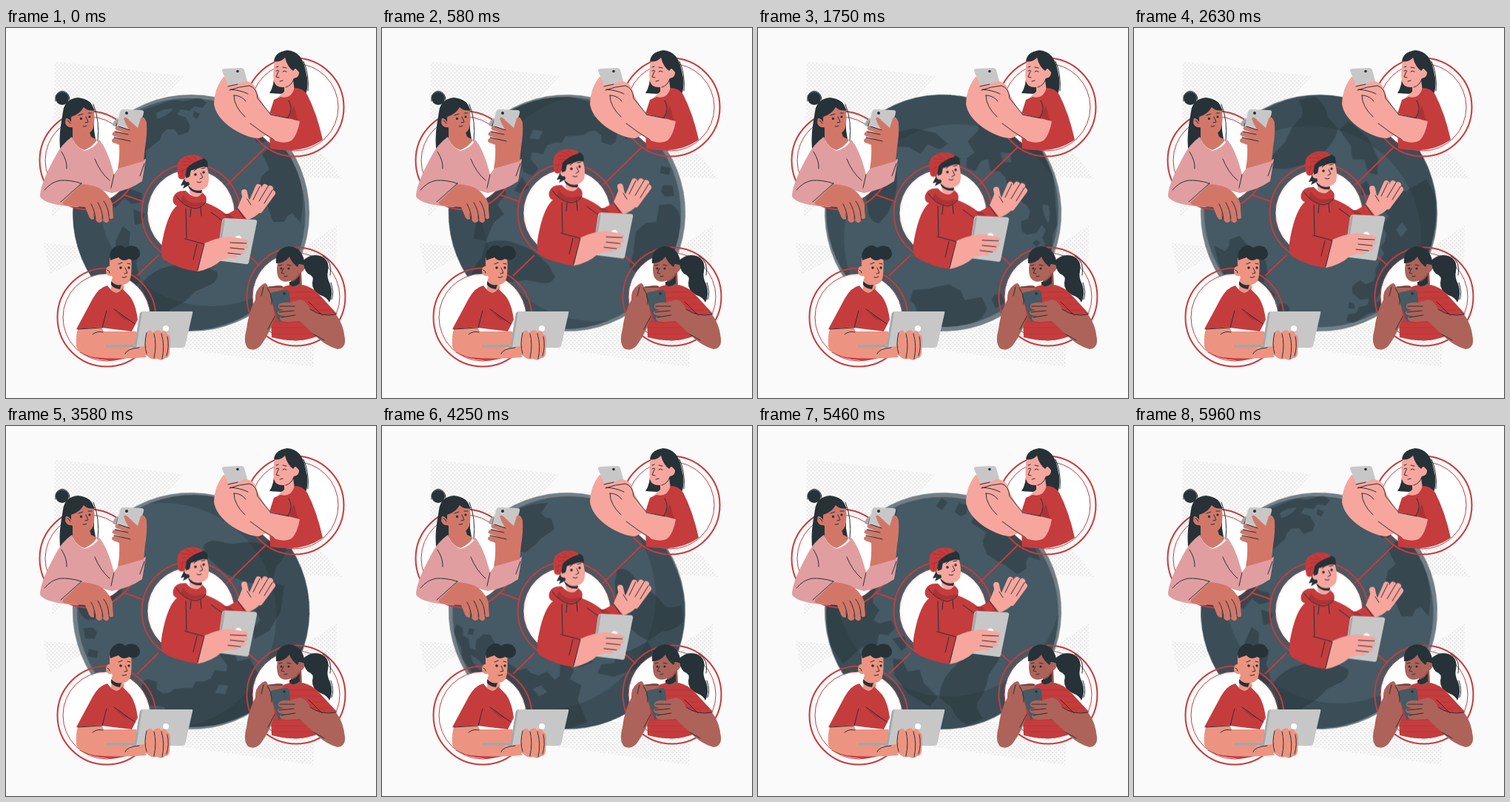
Write an HTML page that moves like this. It is 500 by 500 pixels and loops after 6 s.

```html
<!DOCTYPE html>
<html lang="en">
<head>
<meta charset="utf-8">
<title>Connected world</title>
<style>
html, body { margin: 0; width: 100%; height: 100%; overflow: hidden; background: #fafafa; }
svg { display: block; width: 100vw; height: 100vh; }
#globe { transform-origin: 250px 250px; }
.red { fill: #c53c3d; }
.deep { fill: #a93335; }
.dark { fill: #263238; }
.grey { fill: #c7c7c7; }
.edge { fill: #a6a6a6; }
.white { fill: #fff; }
.pink { fill: #e09ea0; }
.s1 { fill: #d27768; }
.s2 { fill: #f6a69d; }
.s3 { fill: #ec9481; }
.s4 { fill: #ad6359; }
.s5 { fill: #96524a; }
.land { fill: #37474f; }
.line { fill: none; stroke: #263238; stroke-width: 1; stroke-linecap: round; stroke-linejoin: round; }
.ring { fill: none; stroke: #c53c3d; stroke-width: 2; }
.rib { fill: none; stroke: #a93335; stroke-width: 1; }
.fingers { fill: none; stroke: #f6a69d; stroke-width: 8; stroke-linecap: round; }
</style>
</head>
<body>
<svg viewBox="0 0 500 500">
  <defs>
    <pattern id="dots" width="5.4" height="5.4" patternUnits="userSpaceOnUse">
      <circle cx="1.350" cy="1.350" r="1.050" fill="#e0e0e0"/>
      <circle cx="4.050" cy="4.050" r="1.050" fill="#e0e0e0"/>
    </pattern>
    <clipPath id="disc"><circle cx="247.5" cy="251.8" r="157"/></clipPath>
  </defs>

  <path fill="url(#dots)" d="M66 45L240 65L62 256ZM393 130L456 204L378 200ZM50 290L122 298L60 333ZM447 266L446 325L372 318ZM205 402L420 398L415 458L225 432Z"/>

  <g id="globe">
    <circle cx="250" cy="250" r="160" fill="#737f86"/>
    <g clip-path="url(#disc)">
      <rect x="88" y="88" width="324" height="324" fill="#455a64"/>
      <g class="land">
        <path d="M346 170L358 160Q373 158 386 175Q402 205 401 242L398 263L387 250L380 254L376 262L361 262L354 242L349 234L341 217L345 200L356 191Z"/>
        <path d="M183 346Q198 326 222 322Q236 317 250 319L270 322L286 330Q288 343 272 349L256 356Q242 372 224 379Q216 384 218 402L196 398Q186 385 190 366Z"/>
        <path d="M225 97L240 99L262 94L271 101L265 108L254 106L248 112L236 110L231 117L243 121L249 133L246 141L233 145L228 137L217 137L211 143L208 151L197 160L189 166L190 176L182 181L176 190L178 203L164 210L168 218L184 223L183 235L170 238L160 230L148 243L130 233L98 238L95 200L130 145L165 118Z"/>
        <path d="M318 125L330 120L334 129L322 134ZM335 145L346 138L356 148L346 156L338 154Z"/>
        <path d="M172 245L188 251L183 264L174 266ZM158 268L168 276L166 294L181 300L176 318L182 344L166 350L150 318L148 288ZM254 112L262 116L258 123L252 119Z"/>
      </g>
      <path fill="#455a64" d="M203 115Q214 108 226 109Q218 119 204 123ZM148 184L160 178L162 190L151 196Z"/>
      <path fill="#263238" opacity=".3" fill-rule="evenodd" d="M80 80H420V420H80ZM124 223a153 153 0 1 0 306 0a153 153 0 1 0 -306 0Z"/>
    </g>
  </g>

  <path class="ring" d="M158 225L187 235M352 160L299 212M206 307L177 335M327 307L343 321"/>
  <g id="rings"></g>

  <!-- woman with bun -->
  <g>
    <circle class="dark" cx="76" cy="95" r="9"/>
    <path class="line" d="M67 99Q65 87 76 85Q86 87 86 97M118 103Q127 125 124 153"/>
    <path class="dark" d="M77 113Q79 96 97 94Q117 96 119 112L119 138L121 150L110 160L92 148L86 160L74 171Q71 150 74 132Z"/>
    <path class="s1" d="M90 134L90 150Q96 163 106 165Q118 160 123 151L115 147L112 138Z"/>
    <path class="s1" d="M87 117Q80 119 80 128Q82 135 89 134Q94 143 103 145Q114 145 118 135Q121 122 118 109L104 106Z"/>
    <path class="dark" d="M78 124Q78 103 94 98Q111 97 120 111Q111 113 105 107Q99 117 88 120L88 127Q83 119 78 124Z"/>
    <path class="line" d="M108 120L111 127L107 128M104 133Q107 134 109 132M98 118L104 116M111 115L116 115M83 125Q86 126 87 129"/>
    <circle class="dark" cx="101.500" cy="122.500" r="1.700"/><circle class="dark" cx="113" cy="120" r="1.600"/>
    <path class="pink" d="M89 147Q75 157 67 173Q48 207 46 225Q44 236 84 241L98 242L107 213L143 223Q167 219 184 207L189 177L152 189L146 198Q137 163 126 151Q121 162 106 166Q93 161 89 147Z"/>
    <path class="grey" d="M158 110L184 111Q187 112 186 115L174 158L146 156Q144 155 145 151L154 114Q155 110 158 110Z"/>
    <path class="edge" d="M146 126L152 121L148 133L144 132Z"/>
    <circle class="dark" cx="163" cy="115" r="2"/>
    <path class="s1" d="M151 190Q154 175 153 158L144 154Q141 151 146 149L157 150L144 145Q142 141 148 140L160 142L148 137Q146 133 152 133L166 137Q161 129 159 122Q162 119 167 125L178 135L182 122Q187 118 190 128Q191 143 188 161L186 180Z"/>
    <path class="line" d="M147 140L165 144M146 148L168 153M152 133L167 138M75 167Q83 180 82 190M102 210Q86 205 73 206Q61 208 52 219M102 210L74 235M120 177Q127 195 140 206M146 198L142 216M187 183L181 200"/>
    <path class="s1" d="M102 211Q128 212 138 227Q145 235 144 245L145 256Q143 260 140 257L138 250L139 261Q135 266 131 260L129 252L130 261Q125 266 121 259L118 249L119 258Q114 261 111 252L107 242L82 240Q73 238 79 233Z"/>
    <path class="line" d="M132 234Q138 241 139 254M124 236Q130 246 131 258M115 238Q120 247 121 258"/>
  </g>

  <!-- woman with long hair -->
  <g>
    <path class="dark" d="M363 48Q361 33 380 30Q400 31 405 58Q410 76 405 90L388 86L371 89L356 88Q363 78 362 60Z"/>
    <path class="line" d="M402 45Q410 62 408 85"/>
    <path class="s2" d="M388 70L390 85Q385 100 371 99L366 95L376 86L376 78Z"/>
    <path class="s2" d="M364 42Q360 58 362 72Q365 81 375 80Q386 78 389 68Q397 67 396 58Q393 53 388 56L380 38Z"/>
    <path class="dark" d="M362 45Q364 31 382 31Q399 36 398 62L391 54L388 58Q380 52 377 40Q371 47 362 45Z"/>
    <path class="line" d="M368 59L365 66L369 67M370 72L374 71M365 53L368 52M374 53L379 54M378 80Q386 78 389 69"/>
    <path class="line" d="M365 58Q367 56 369 58M374 59Q376 57 379 59"/>
    <path class="s2" d="M294 66Q281 82 281 103Q284 121 306 136Q327 149 342 149L356 143L351 115L316 72Z"/>
    <path class="red" d="M390 81Q401 81 407 90Q420 115 428 151Q400 171 357 163L355 119L362 97L371 93Q385 97 390 81Z"/>
    <path class="deep" d="M395 126L382 121L389 105Z"/>
    <path class="grey" d="M295 55L318 54Q321 54 322 57L328 78L302 82L292 58Q292 55 295 55Z"/>
    <circle class="dark" cx="313" cy="58.500" r="1.800"/>
    <path class="s2" d="M357 116L397 126Q394 144 386 152Q376 158 361 151L340 139L322 121Q307 106 308 91L300 91Q296 85 303 83L300 79Q302 74 312 76L323 72Q333 72 338 82Q340 94 357 116Z"/>
    <path class="line" d="M357 116L340 95Q339 81 329 78Q315 79 302 84M303 83Q317 84 327 89M308 91Q318 91 324 99M308 91Q308 106 323 120M330 129Q344 140 362 151M300 79L313 76M357 117L382 122M382 98Q389 109 381 121"/>
  </g>

  <!-- man in beanie -->
  <g id="man">
    <path class="dark" d="M240 205L236 213L241 212L239 217L252 210L249 193L272 188Q274 177 266 176L246 183L241 197Z"/>
    <path class="s2" d="M248 207L248 222Q256 236 267 224L263 216Z"/>
    <path class="dark" d="M246 212Q253 222 265 219L264 223Q252 224 247 216Z"/>
    <path class="s2" d="M249 193L271 186Q276 201 273 212Q268 220 259 219Q249 217 247 208Q241 209 241 203Q243 197 248 201Z"/>
    <path class="dark" d="M243 190Q248 177 264 175Q273 178 273 188Q263 188 258 185L250 192L248 201L243 203Z"/>
    <path class="red" d="M233 202Q229 184 235 178Q245 169 258 172Q265 174 266 177Q251 181 244 190L242 202Q237 207 233 202Z"/>
    <path class="rib" d="M237 202L239 190M234 194L243 191M238 186L247 185M237 180L250 181M243 175L253 180M251 172L258 178"/>
    <path class="line" d="M263 196L266 202L262 204M258 208Q261 210 264 208M254 193L258 190M264 190L269 189"/>
    <circle class="dark" cx="256" cy="198" r="1.800"/><circle class="dark" cx="267" cy="195" r="1.700"/>
    <path class="red" d="M226 229Q229 219 243 220Q257 235 265 223Q273 227 270 236Q286 242 298 252L313 244L326 257L310 267L294 262L291 287L268 292L259 329Q234 326 213 313Q207 307 212 284Q219 250 231 240Q224 238 226 229Z"/>
    <path class="deep" d="M239 226Q248 241 265 235L269 237Q252 248 236 234ZM293 251L301 251L310 258L303 261Z"/>
    <path class="line" d="M230 227Q240 242 256 244Q266 242 270 235M243 244L244 284M250 244L249 255M263 242L264 254M242 285L268 292M258 292L253 313M292 260L277 249M313 244L322 257"/>
    <path class="fingers" d="M322 222L326 240M341 215L331 238M350 215L336 240M357 217L340 244M360 223L343 246"/>
    <path class="s2" d="M313 243L320 226L330 232L353 234Q350 243 344 248Q336 257 326 259Z"/>
    <path class="line" d="M343 214L334 232M354 214L342 234M360 219L349 237M326 231L331 239"/>
    <path class="grey" d="M297 257L337 259Q340 260 339 263L328 317Q327 320 324 319L284 314L292 260Q293 257 297 257Z"/>
    <path class="edge" d="M293 260L296 258L287 314L284 314Z"/>
    <circle class="white" cx="314" cy="285" r="4.500"/>
    <path class="s2" d="M268 291Q285 283 302 282L322 285Q329 287 327 290L318 291L327 294Q328 298 322 298L316 298L324 302Q323 306 317 306L308 305L314 308Q312 312 304 310L292 313Q279 325 259 329Z"/>
    <path class="line" d="M303 290L325 291M303 297L322 299M300 304L317 306M268 292L259 327"/>
  </g>

  <!-- man with laptop -->
  <g>
    <path class="s3" d="M143 338L142 354Q153 363 160 351L158 346Z"/>
    <path class="dark" d="M142 342Q148 349 156 347L154 353Q145 352 142 347Z"/>
    <path class="s3" d="M140 310L169 309Q171 331 167 342Q162 348 155 347Q145 345 143 335Q135 336 135 328Q136 321 140 322Z"/>
    <path class="dark" d="M141 314Q138 302 147 296Q155 291 161 297Q168 292 176 296Q183 302 180 309Q175 316 166 312Q158 317 152 310L146 312Z"/>
    <path class="line" d="M161 324L164 331L160 332M157 337Q160 338 163 336M152 319L157 317M164 318L168 319M137 327Q140 328 140 331"/>
    <circle class="dark" cx="155" cy="324" r="1.800"/><circle class="dark" cx="166" cy="324" r="1.700"/>
    <path class="red" d="M137 348Q126 350 117 366L95 407L129 405L170 410L178 394Q175 371 166 361L157 352Q149 365 137 348ZM99 438Q130 456 167 445L160 430Z"/>
    <path class="deep" d="M146 382L176 400L169 396L160 394Z"/>
    <path class="s3" d="M97 407L129 404L132 410L176 410L176 430L165 433Q158 437 161 441L184 437L190 445Q150 448 120 445Q97 440 95 430Q94 416 97 407Z"/>
    <path class="line" d="M130 405L136 382M146 380L174 400M117 414Q123 409 131 411M97 407L129 405"/>
    <path class="edge" d="M136 428H188V432H136Q134 430 136 428Z"/>
    <path class="grey" d="M184 383L251 383Q253 383 252 386L242 430Q241 432 238 432L173 432L181 386Q182 383 184 383Z"/>
    <path class="edge" d="M181 385L184 383L176 432H173Z"/>
    <circle class="white" cx="216" cy="406" r="4"/>
    <path class="s3" d="M160 440Q158 436 165 433L187 430L190 411Q195 406 199 412Q205 405 210 411Q216 407 218 414Q222 414 222 421L221 440Q220 446 215 446Q210 451 205 447Q196 449 191 443L178 440Q167 443 160 440Z"/>
    <path class="line" d="M190 412Q186 427 190 440M200 413Q204 428 200 446M210 413Q215 429 211 447M218 417Q221 430 217 443M161 440Q164 433 180 432"/>
  </g>

  <!-- woman with ponytail -->
  <g>
    <path class="dark" d="M401 315Q411 304 425 308Q438 313 435 329Q433 337 438 346Q443 359 437 371Q434 364 425 361Q413 355 414 344Q417 335 408 332Q402 326 401 315Z"/>
    <path class="line" d="M428 308Q442 316 438 334M439 344Q444 358 440 367"/>
    <path class="s5" d="M386 335L384 349Q391 357 400 349L399 328Z"/>
    <path class="dark" d="M383 343Q391 343 397 334L397 345Q390 351 383 348Z"/>
    <path class="s4" d="M368 312Q364 327 368 337Q373 345 383 342Q393 339 396 331Q404 330 403 322Q401 316 395 320L388 305Z"/>
    <path class="dark" d="M365 318Q363 298 382 295Q399 296 403 314L402 320L396 319L394 323Q386 317 383 309Q376 318 365 318Z"/>
    <path class="line" d="M375 325L372 331L376 332M376 336L380 335M369 321L373 320M380 320L385 321"/>
    <circle class="dark" cx="372" cy="325" r="1.500"/><circle class="dark" cx="382" cy="325" r="1.600"/>
    <path class="red" d="M384 347Q392 355 401 347Q414 350 423 360L447 386L430 397L423 396L420 417Q393 427 359 418L357 380L358 361Q366 351 384 347Z"/>
    <path class="rib" opacity=".6" d="M368 357H419M359 365H427M358 373H433M358 381H441M358 389H438M358 397H424M358 405H422M359 413H420"/>
    <path class="s4" d="M346 347Q352 342 354 350L365 348Q378 347 374 353L363 358L360 370L363 390Q358 410 345 428Q337 438 327 433Q320 425 325 407Q328 383 337 367Q336 354 346 347Z"/>
    <path fill="#455a64" d="M360 357L378 354Q382 354 383 358L386 390L368 397L357 362Q357 358 360 357Z"/>
    <circle class="dark" cx="376" cy="359" r="1.700"/>
    <path class="s4" d="M368 375Q370 370 383 371L398 367Q407 370 411 380Q426 391 446 387Q456 400 458 420Q459 433 448 434Q432 430 416 414L397 396L381 397Q369 397 370 391L378 389Q366 389 367 383L376 381Q366 380 368 375Z"/>
    <path class="line" d="M370 376L390 376M369 384L389 382M372 391L391 388M411 380Q426 391 446 387M348 350L345 362M353 351Q360 361 359 373M355 350L373 350M363 390L354 407M416 414L430 422M409 370L427 388"/>
  </g>
</svg>
<script>
const LOOP = 6000, BOB = 1500;
const spots = [[112, 179], [390, 107], [136, 391], [392, 363], [250, 250]];

document.getElementById('rings').innerHTML = spots.map(([x, y]) =>
  `<circle class="ring" cx="${x}" cy="${y}" r="66.5"/>
   <circle cx="${x}" cy="${y}" r="59" fill="#fff" stroke="#c53c3d"/>`).join('');

function play(id, frames, duration) {
  document.getElementById(id).animate(frames, { duration, iterations: Infinity, easing: 'linear' });
}

play('globe', [{ transform: 'rotate(0deg)' }, { transform: 'rotate(360deg)' }], LOOP);
play('man', [0, -10, 0].map(y => ({ transform: `translateY(${y}px)` })), BOB);
</script>
</body>
</html>
```
